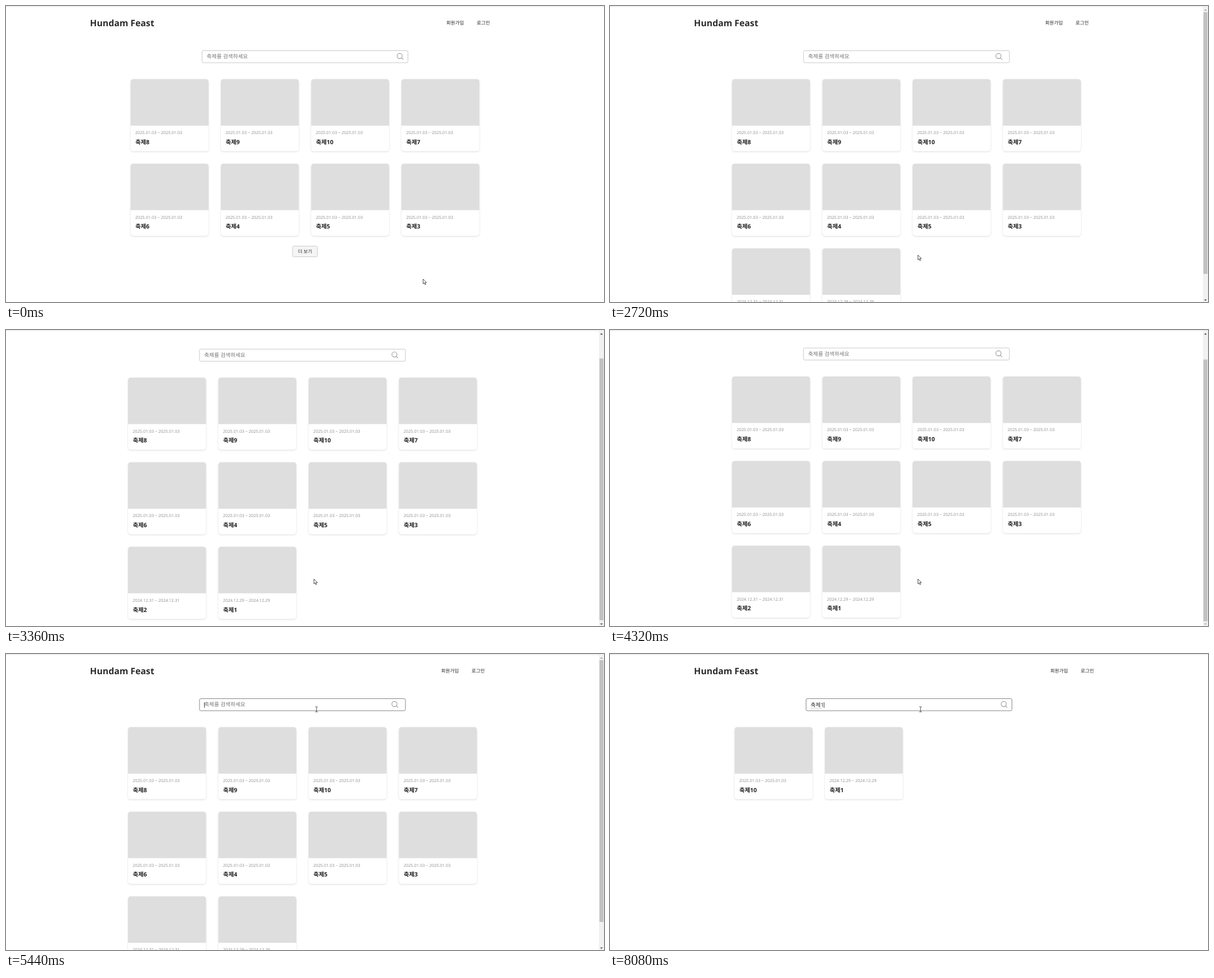
Animation, 1063 px wide and 527 px high, one loop 8320 ms. Source, as an HTML page:

```html
<!DOCTYPE html>
<html lang="ko">
<head>
<meta charset="utf-8">
<title>Festival search</title>
<style>
  html, body { margin: 0; width: 100%; height: 100%; overflow: hidden; background: #fff; }
  svg { display: block; width: 1063px; height: 527px; }
  text {
    font-family: "Open Sans", "Noto Sans CJK KR", "Noto Sans CJK", sans-serif;
    text-rendering: geometricPrecision;
    white-space: pre;
  }
  .brand { font-size: 15.8px; font-weight: 700; fill: #2b2b2b; }
  .menu { font-size: 8.5px; fill: #222; }
  .hint { font-size: 9.6px; fill: #757575; }
  .typed { font-size: 9.6px; fill: #222; }
  .date { font-size: 7.4px; fill: #8c8c8c; }
  .name { font-size: 10.4px; font-weight: 700; fill: #222; }
  .more { font-size: 8.4px; fill: #333; }
  .card { fill: #fff; filter: drop-shadow(0 1px 1.6px rgba(0, 0, 0, .14)); }
  .photo { fill: #dedede; }
</style>
</head>
<body>
<svg viewBox="0 0 1063 527">
  <g id="page">
    <text class="brand" x="149.3" y="36">Hundam Feast</text>
    <g id="menu">
      <text class="menu" x="782.8" y="33">회원가입</text>
      <text class="menu" x="836.8" y="33">로그인</text>
    </g>
    <g id="body">
      <rect id="field" x="348.5" y="79.5" width="366" height="21.5" rx="2.5" fill="#fff"/>
      <text id="hint" class="hint" x="356.8" y="93.3">축제를 검색하세요</text>
      <text id="typed" class="typed" x="356.8" y="94.4"></text>
      <path id="mark" d="M357 96.5H377" stroke="#999" stroke-width=".8" stroke-dasharray="1.5 1"/>
      <rect id="caret" y="86" width=".9" height="9.8" fill="#222"/>
      <g id="cards"></g>
      <g id="more">
        <rect x="509.5" y="427.5" width="44" height="19" rx="2" fill="#f5f5f5" stroke="#ccc"/>
        <text class="more" x="518.9" y="440">더 보기</text>
      </g>
    </g>
    <g id="lens" fill="none" stroke="#999" stroke-width="1.1" stroke-linecap="round">
      <circle cx="699.8" cy="89" r="4.6"/>
      <path d="M703.1 92.3L706 95.2"/>
    </g>
  </g>
  <g id="bar">
    <rect x="1054" y="2" width="9" height="525" fill="#f1f1f1"/>
    <rect id="thumb" x="1055" y="11" width="7" height="466" fill="#c1c1c1"/>
    <path id="up" d="M1056 8.2L1058.5 5.6L1061 8.2Z"/>
    <path id="down" d="M1056 522.4L1058.5 525L1061 522.4Z"/>
  </g>
  <rect width="1063" height="1" fill="#fff"/>
  <rect y=".6" width="1063" height="1" fill="#dfdfdf"/>
  <g id="pointer" stroke="#222" stroke-width=".8" stroke-linejoin="round">
    <path id="arrow" fill="#fff" d="M.4 .4V9L2.4 7.2L3.8 10.3L5.2 9.7L3.8 6.7H6.6Z"/>
    <path id="hand" fill="#fff" d="M-.9 .9Q0 -.2 .8 .9V4L4 4.7Q5 5 5 6L4.3 10.5H-.7L-3.6 6.9Q-3.4 5.5 -2.2 6.3L-.9 7.4Z"/>
    <path id="beam" fill="none" d="M-2.3 -4.5H-.7L0 -4L.7 -4.5H2.3M0 -4V4M-2.3 4.5H-.7L0 4L.7 4.5H2.3"/>
  </g>
</svg>
<script>
const LOOP = 8320, STEP = 80;
const LOADED = 2720, FOCUS = 5440, FOUND = 7440;
const $ = id => document.getElementById(id);
const show = (id, on) => $(id).setAttribute('display', on ? 'inline' : 'none');
const move = (id, x, y = 0) => $(id).setAttribute('transform', `translate(${x} ${y})`);

const DAYS = { 1: '2024.12.29', 2: '2024.12.31' };
const LISTS = {
  first: [8, 9, 10, 7, 6, 4, 5, 3],
  all: [8, 9, 10, 7, 6, 4, 5, 3, 2, 1],
  found: [10, 1]
};

function card(n, i) {
  const x = 221.5 + (i % 4) * 160.5;
  const y = 130.2 + Math.floor(i / 4) * 150.6;
  const day = DAYS[n] || '2025.01.03';
  return `<g transform="translate(${x} ${y})">
    <rect class="card" width="138.5" height="128.4" rx="5"/>
    <path class="photo" d="M0 82.8V5Q0 0 5 0H133.5Q138.5 0 138.5 5V82.8Z"/>
    <text class="date" x="8.2" y="97.8">${day} ~ ${day}</text>
    <text class="name" x="8.4" y="115.5">축제${n}</text>
  </g>`;
}

$('cards').innerHTML = Object.entries(LISTS)
  .map(([id, list]) => `<g id="${id}">${list.map(card).join('')}</g>`).join('');

// [start time, value]
const SCROLL = [[0, 0], [3200, .5], [3280, 25], [3360, 45.4], [3440, 48],
  [4320, 47.5], [4400, 23], [4480, 2.7], [4560, 0]];
const TYPING = [[0, ''], [6160, 'ㅊ'], [6320, '추'], [6480, '축'],
  [6560, '축ㅈ'], [6720, '축제'], [7040, '축제1']];
const at = (steps, t) => steps.filter(s => s[0] <= t).pop()[1];

const ease = p => {
  p = Math.min(1, Math.max(0, p));
  return p * p * (3 - 2 * p);
};
const mix = (a, b, p) => a + (b - a) * p;

function pointerAt(t) {
  const a = ease((t - 1360) / 640), b = ease((t - 4720) / 560);
  return [mix(mix(741, 547, a), 552, b), mix(mix(485.7, 443, a), 98.5, b)];
}

function draw(t) {
  const wide = t < LOADED || t >= FOUND;
  const scroll = at(SCROLL, t);
  const word = at(TYPING, t);
  const focus = t >= FOCUS;

  move('page', 0, -scroll);
  move('menu', wide ? 0 : -9.3);
  move('body', wide ? 0 : -4.5);
  move('lens', wide ? 0 : -9.3);
  show('first', t < LOADED);
  show('more', t < LOADED);
  show('all', !wide);
  show('found', t >= FOUND);

  $('field').setAttribute('stroke', focus ? '#858585' : '#c8c8c8');
  show('hint', !word);
  if ($('typed').textContent !== word) $('typed').textContent = word;
  $('caret').setAttribute('x', 356.8 + (word ? $('typed').getComputedTextLength() : 0));
  show('caret', focus && (t < 6000 || word));
  show('mark', t >= FOUND);

  show('bar', !wide);
  $('thumb').setAttribute('y', 11 + scroll * .875);
  $('up').setAttribute('fill', scroll > 0 ? '#505050' : '#a3a3a3');
  $('down').setAttribute('fill', scroll < 47 ? '#505050' : '#a3a3a3');

  const [x, y] = pointerAt(t);
  const onButton = t < LOADED && x < 554 && y < 447;
  const onField = y < 101;
  move('pointer', x, y);
  show('hand', onButton);
  show('beam', onField);
  show('arrow', !onButton && !onField);
}

const start = performance.now();
function tick() {
  const t = (performance.now() - start) % LOOP;
  draw(Math.floor(t / STEP) * STEP);
  requestAnimationFrame(tick);
}
tick();
</script>
</body>
</html>
```
